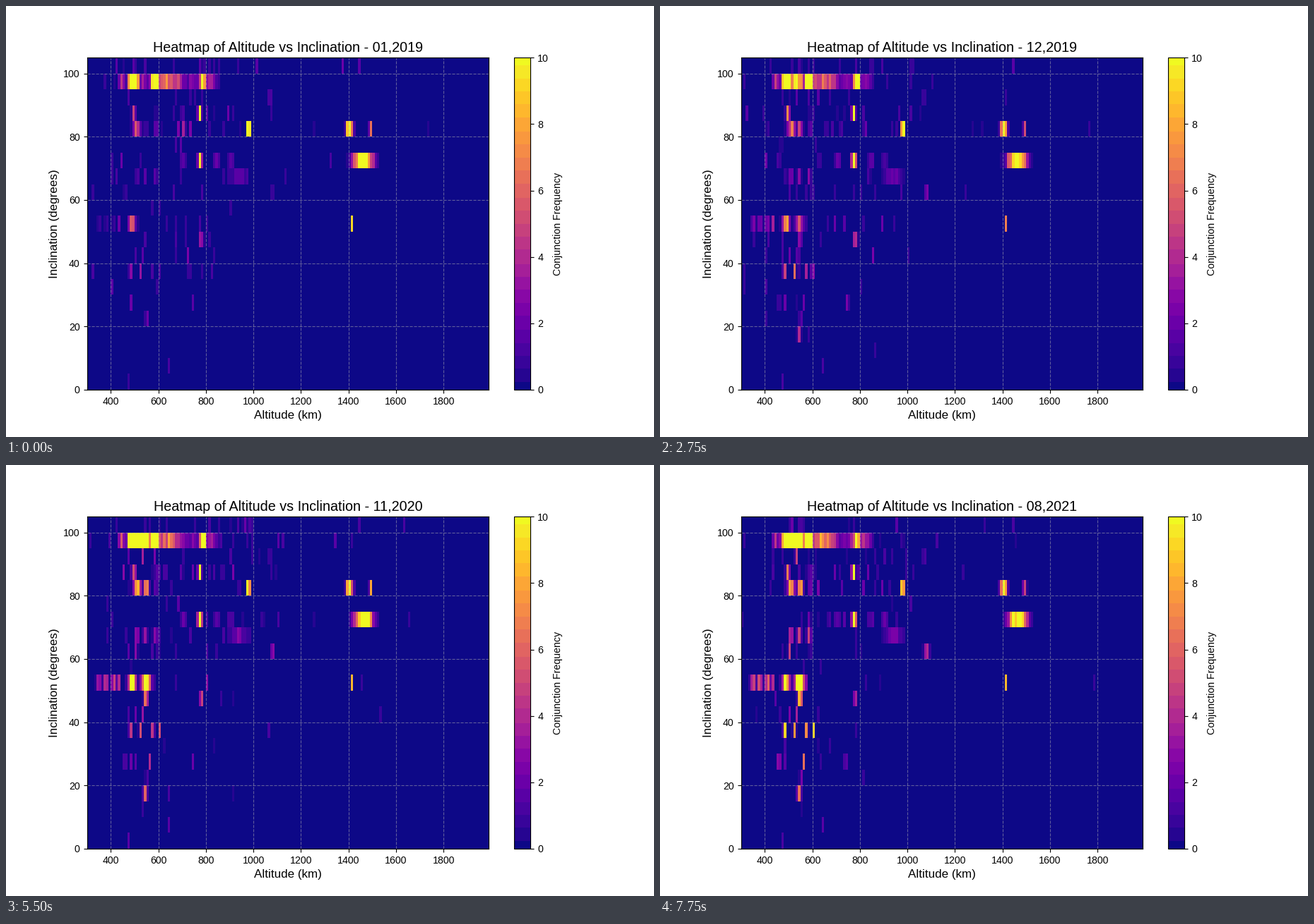
These frames come from a looping animation (917x611 px, 8 s). A matplotlib script:

```python
import matplotlib.pyplot as plt
import numpy as np
from matplotlib.animation import FuncAnimation
from matplotlib.colors import ListedColormap

DPI = 101.875
MONTHS = 32

plt.rcParams["font.family"] = "Liberation Sans"
rng = np.random.default_rng(12)
alts = np.arange(300, 1990, 10)
incls = np.arange(0, 105, 5)
years = np.linspace(0, 1, MONTHS)[:, None]  # share of the whole period


def scatter():
    """Faint stray cells, denser at high inclination and middle altitude."""
    inc = incls[:, None]
    crowd = np.exp(-((alts - 500 - 2.5 * inc) / 330) ** 2)
    chance = 0.2 * (inc / 100) ** 1.3 * crowd + 0.004 * inc / 100
    chance = np.where(np.isin(inc, (55, 75)), 0.3, 1) * chance
    chance = chance * rng.exponential(1, chance.shape)  # favourite cells recur
    shape = (MONTHS, *chance.shape)
    return (rng.random(shape) < chance) * (0.55 + rng.exponential(0.4, shape))


def peak(incl, centres, width, start, end=None):
    """Bell-shaped hot spots whose height goes from start to end."""
    end = start if end is None else end
    row = grid[:, incl // 5]
    for centre in np.atleast_1d(centres):
        bell = np.exp(-((alts - centre) / width) ** 2)
        level = (start + (end - start) * years) * bell
        level = level * rng.uniform(0.7, 1.3, row.shape)
        np.maximum(row, np.where(level > 0.4, level, 0), out=row)


grid = scatter()

# Sun-synchronous band, filling up between 460 and 600 km
peak(95, 490, 20, 16, 30)
peak(95, 530, 25, 3, 30)
peak(95, 580, 15, 15, 22)
peak(95, 640, 65, 6, 7)
peak(95, 740, 45, 2.2)
peak(95, 782, 14, 11, 13)
peak(95, 815, 30, 3, 4)
peak(95, 440, 12, 5)

# Polar bands
peak(100, (540, 1440), 7, 1.2)
peak(90, (470, 1065), 8, 1.2)
peak(90, 530, 5, 0, 5)
peak(85, 492, 8, 5, 9)
peak(85, 769, 7, 14)
peak(85, 590, 20, 0.5, 1.5)
peak(80, 505, 16, 5, 8)
peak(80, 545, 10, 1, 12)
peak(80, 585, 10, 2)
peak(80, 975, 7, 18, 15)
peak(80, 1400, 13, 12)
peak(80, 1488, 7, 6, 7)

# Old rocket bodies between 60 and 75 degrees
peak(70, 771, 10, 10)
peak(70, 1458, 36, 14, 13)
peak(70, (700, 840, 900), 15, 1.8)
peak(65, (505, 540, 582), 8, 1.5, 5)
peak(65, 935, 40, 1.8, 2.4)
peak(60, 1076, 10, 1, 4)
peak(60, 500, 7, 0, 4)

# Growing constellation shell
peak(50, 485, 16, 5, 10)
peak(50, 542, 20, 0, 15)
peak(50, (345, 375, 408), 12, 0.7, 5)
peak(50, 430, 6, 2, 4)
peak(50, 1410, 5, 8)
peak(45, 544, 9, 0, 9)
peak(45, 776, 9, 4, 5)

# Narrow lines at low inclination
peak(40, (500, 530), 5, 1.5, 3)
peak(35, (478, 520), 6, 3.5, 8)
peak(35, (570, 600), 5, 1.5, 8)
peak(25, (455, 560), 5, 0, 6)
peak(25, (480, 740), 5, 1.8)
peak(20, 547, 6, 2.5)
peak(15, 540, 7, 0, 9)
peak(5, 640, 5, 1.4)
peak(0, 470, 5, 1.4)

grid = np.clip(grid, 0, 10)

# Plasma in 26 visible steps
steps = np.round(np.linspace(0, 25, 256)) / 25
cmap = ListedColormap(plt.get_cmap("plasma")(steps))

# The tiny margin keeps the pixel size from rounding down
fig, ax = plt.subplots(figsize=((917 + 1e-6) / DPI, (611 + 1e-6) / DPI), dpi=DPI)
mesh = ax.pcolormesh(np.append(alts, 1990), np.append(incls, 105), grid[0],
                     cmap=cmap, vmin=0, vmax=10)
fig.colorbar(mesh, ax=ax, label="Conjunction Frequency")
ax.set_xlabel("Altitude (km)", fontsize=12)
ax.set_ylabel("Inclination (degrees)", fontsize=12)
ax.set_xticks(range(400, 1801, 200))
ax.set_yticks(range(0, 101, 20))
ax.grid(True, linestyle="--", alpha=0.5)
title = ax.set_title("", fontsize=14)


def update(i):
    mesh.set_array(grid[i])
    year, month = divmod(i, 12)
    title.set_text(f"Heatmap of Altitude vs Inclination - {month + 1:02d},{2019 + year}")
    return mesh, title


anim = FuncAnimation(fig, update, frames=MONTHS, interval=250, repeat=True)
plt.show()
```
